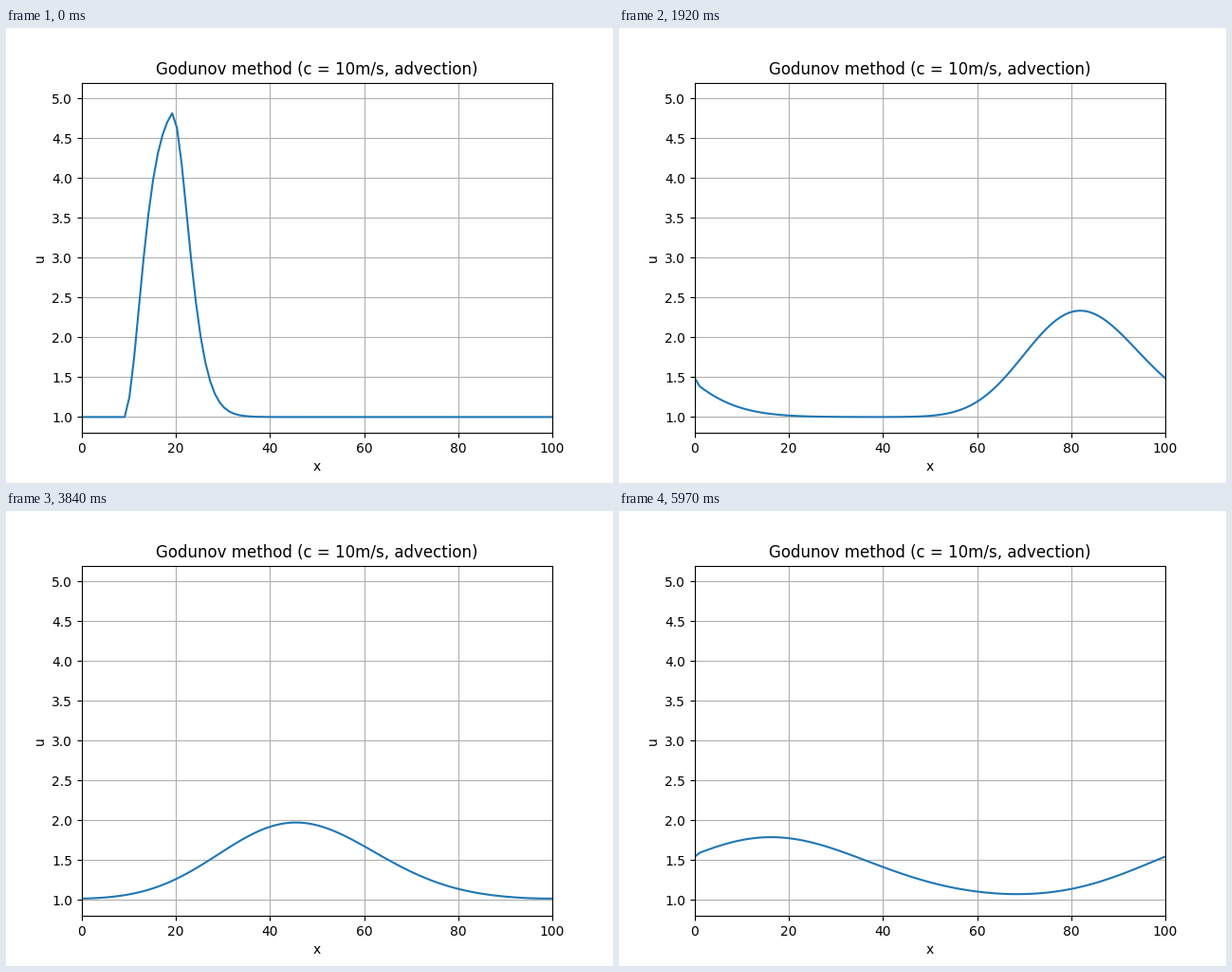
Animation of 640x480 px, one loop 6 s. Source, as a matplotlib script:

```python
import numpy as np
import matplotlib.pyplot as plt
from matplotlib.animation import FuncAnimation

FRAMES = 200
INTERVAL = 30   # ms
WARMUP = 4      # steps already taken when the loop starts
CFL = 0.5
N = 100


def step(u):
    """One in-place upwind sweep, left to right, with a periodic inlet."""
    u = u.copy()
    for i in range(1, N):
        u[i] -= CFL * (u[i] - u[i - 1])
    u[0] = u[-1]
    return u


x = np.linspace(0, 100, N)
state = np.where((x >= 10) & (x <= 20), 5.0, 1.0)
history = [state]
for _ in range(WARMUP + FRAMES):
    history.append(step(history[-1]))

fig, ax = plt.subplots(figsize=(6.4, 4.8), dpi=100)
line, = ax.plot(x, history[WARMUP])
ax.set(xlim=(0, 100), ylim=(0.8, 5.2), xlabel="x", ylabel="u",
       title="Godunov method (c = 10m/s, advection)")
ax.grid(True)


def update(frame):
    line.set_ydata(history[WARMUP + frame])
    return line,


anim = FuncAnimation(fig, update, frames=FRAMES, interval=INTERVAL,
                     repeat=True, repeat_delay=0)
plt.show()
```
